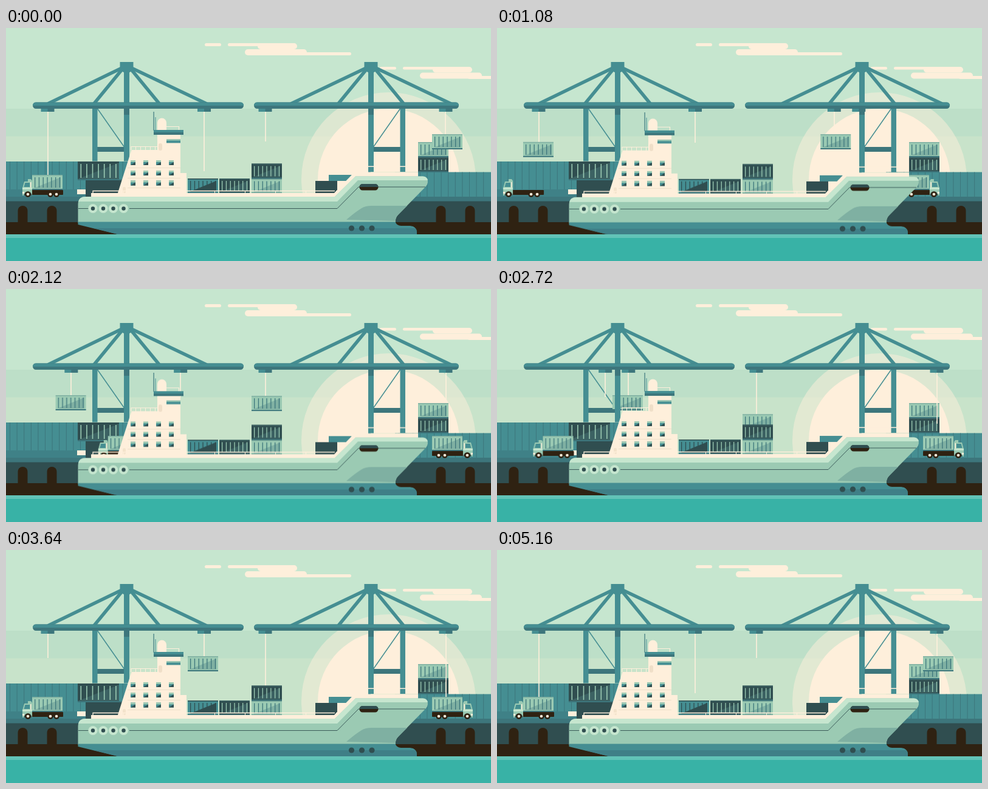
These frames come from a looping animation (798x384 px, 5.2 s). An HTML page:

```html
<!DOCTYPE html>
<html lang="en">
<head>
<meta charset="utf-8">
<title>Harbour</title>
<style>
html, body { margin: 0; width: 100%; height: 100%; overflow: hidden; background: #c6e6cf; }
svg { display: block; width: 798px; height: 384px; }
.move { animation: 5.2s cubic-bezier(.333, 0, .667, 1) infinite; }

/* left crane */
.l-out { animation-name: l-out; }
.l-back { animation-name: l-back; }
.l-load { animation-name: l-load; }
.l-free { animation-name: l-free; }
.l-box-x { animation-name: l-box-x; }
.l-box-y { animation-name: l-box-y; }
@keyframes l-out { 0%, 31.5% { transform: translateX(68.5px) } 69.4%, 100% { transform: translateX(326px) } }
@keyframes l-back { 0%, 31.5% { transform: translateX(326px) } 69.4%, 100% { transform: translateX(68.5px) } }
@keyframes l-load {
  0%, 1.7% { transform: translateY(242px) }
  28.2%, 71% { transform: translateY(175px) }
  98.3% { transform: translateY(248px) }
  98.9%, 100% { transform: translateY(236px) }
}
@keyframes l-free {
  0%, 1.7% { transform: translateY(236px) }
  28.2%, 70.2% { transform: translateY(178px) }
  95.5%, 100% { transform: translateY(242px) }
}
@keyframes l-box-x { 0%, 31.5% { transform: translateX(43px) } 69.4%, 100% { transform: translateX(299px) } }
@keyframes l-box-y {
  0%, 1.7% { transform: translateY(242px) }
  28.2%, 71% { transform: translateY(175px) }
  98.3%, 100% { transform: translateY(248px) }
}

/* right crane */
.r-out { animation-name: r-out; }
.r-back { animation-name: r-back; }
.r-load { animation-name: r-load; }
.r-free { animation-name: r-free; }
.r-box-x { animation-name: r-box-x; }
.r-box-y { animation-name: r-box-y; }
.r-lift { animation-name: r-lift; }
@keyframes r-out { 0% { transform: translateX(723.5px) } 38.1%, 100% { transform: translateX(426.5px) } }
@keyframes r-back { 0% { transform: translateX(426.5px) } 38.1%, 100% { transform: translateX(723.5px) } }
@keyframes r-load {
  0%, 38.7% { transform: translateY(175px) }
  61.7%, 71.7% { transform: translateY(224px) }
  98.2%, 100% { transform: translateY(178px) }
}
@keyframes r-free {
  0%, 38.7% { transform: translateY(187px) }
  61.7%, 71.7% { transform: translateY(242px) }
  98.2%, 100% { transform: translateY(175px) }
}
@keyframes r-box-x { 0% { transform: translateX(701px) } 38.1%, 100% { transform: translateX(404px) } }
@keyframes r-box-y { 0%, 38.7% { transform: translateY(175px) } 61.7%, 100% { transform: translateY(224px) } }
@keyframes r-lift { 0%, 71.7% { transform: translateY(242px) } 98.2%, 100% { transform: translateY(175px) } }

/* trucks and their loads */
.l-truck { animation-name: l-truck; }
.l-cargo { animation-name: l-cargo; }
.r-truck { animation-name: r-truck; }
.r-cargo { animation-name: r-cargo; }
@keyframes l-truck {
  0%, 5% { transform: none }
  11.5% { transform: translateX(2px); animation-timing-function: cubic-bezier(.32, 0, .67, 0) }
  28.4% { transform: translateX(-110px); animation-timing-function: step-start }
  29%, 36.7% { transform: translateX(180px); animation-timing-function: cubic-bezier(.33, 1, .68, 1) }
  72.4%, 100% { transform: none }
}
@keyframes l-cargo {
  0%, 36.7% { transform: translateX(180px); animation-timing-function: cubic-bezier(.33, 1, .68, 1) }
  72.4%, 100% { transform: none }
}
@keyframes r-truck {
  0%, 10.1% { transform: translateX(-133px); animation-timing-function: cubic-bezier(.33, 1, .68, 1) }
  42.4%, 75% { transform: none }
  81.5% { transform: translateX(-2px); animation-timing-function: cubic-bezier(.32, 0, .67, 0) }
  98.5%, 100% { transform: translateX(110px) }
}
@keyframes r-cargo {
  0%, 10.1% { transform: translateX(-133px); animation-timing-function: cubic-bezier(.33, 1, .68, 1) }
  42.4%, 100% { transform: none }
}

.ship { animation-name: dip; }
@keyframes dip {
  0% { transform: none }
  11.5% { transform: translateY(1px) }
  29.2% { transform: translateY(.6px) }
  58%, 100% { transform: none }
}
</style>
</head>
<body>
<svg id="stage" viewBox="0 0 798 384" xmlns="http://www.w3.org/2000/svg"></svg>
<script>
const cream = '#feefdb', pale = '#c6e6cf', mint = '#9bcab3', sage = '#7fb0a2',
      teal = '#458e92', deep = '#3d767c', dark = '#304e50', brown = '#2f2212';

const rect = (x, y, w, h, fill, r = 0) =>
  `<rect x="${x}" y="${y}" width="${w}" height="${h}" rx="${r}" fill="${fill}"/>`;
const path = (d, fill) => `<path d="${d}" fill="${fill}"/>`;
const line = (d, color, w = 1) => `<path d="${d}" fill="none" stroke="${color}" stroke-width="${w}"/>`;
const dot = (x, y, r, fill, alpha = 1) => `<circle cx="${x}" cy="${y}" r="${r}" fill="${fill}" opacity="${alpha}"/>`;
const at = (x, y, body) => `<g transform="translate(${x} ${y})">${body}</g>`;
const move = (name, body) => `<g class="move ${name}">${body}</g>`;
const row = (n, x, step, draw) => Array.from({ length: n }, (_, i) => draw(x + i * step)).join('');

function box(body = mint, shade = sage, rib = deep) {
  return rect(0, 0, 50, 25, body) + path('M3 22L47 4V22Z', shade) +
    row(7, 4, 6.8, x => rect(x, 4, 1.3, 17, rib)) +
    rect(0, 0, 50, 1.5, shade) + rect(0, 23, 50, 2, deep);
}
const darkBox = box(dark, '#3c6263', mint);
const tealBox = box(teal, dark, dark);

function truck() {
  const wheel = x => dot(x, 274, 4.8, brown) + dot(x, 274, 2.3, cream);
  return rect(14, 267, 53, 8, brown, 1) +
    path('M0 276V264L3 253H9V249H14L16 252V276Z', mint) + path('M2.500 262L4.500 255H12V262Z', teal) +
    rect(13, 254, 1.5, 11, cream) + rect(0, 263, 16, 3, pale) +
    path('M2.500 276a6.500 6.500 0 0 1 13 0Z', dark) + rect(0, 270, 3, 3, cream) +
    wheel(9) + wheel(46) + wheel(56);
}

const trolley = name => move(name, rect(-11, 132, 22, 6, teal) + rect(0, 132, 11, 6, deep));
const rope = (travel, drop) => move(travel, move(drop, rect(-.8, -300, 1.6, 300, cream)));

// Rear leg, drawn around the tower axis; dir is the side it stands on.
const leg = (x, dir, foot) => at(x, 0, `<g transform="scale(${dir} 1)">` +
  line('M48 133L4 196', teal, 1.5) + rect(4, 196, 46, 8, deep) +
  rect(48, 130, 8.5, foot - 130, teal) + '</g>');

function crane(x, from, to, stays, foot) {
  return at(x, 0,
    stays.map(s => line(`M${Math.sign(s) * 4} 64L${s} 125`, teal, 5.6)).join('') +
    rect(-4.5, 62, 9, foot - 62, teal) + rect(-4.5, 133, 9, 10, deep) +
    rect(-11, 56, 22, 13, teal) + path('M-11 69H11L5 73H-5Z', teal) +
    rect(from, 122.5, to - from, 10.5, deep, 5.2) +
    path(`M${from} 128Q${from} 122.5 ${from + 5} 122.5H${to - 5}Q${to} 122.5 ${to} 128Z`, teal));
}

function sky() {
  const clouds = [[327, 25, 27, 5], [365, 25, 110, 5], [414, 25, 65, 10], [393, 35, 102, 10], [470, 40, 98, 5],
    [615, 64, 27, 4.5], [653, 64, 100, 4.5], [702, 64, 65, 9.5], [681, 73.5, 102, 10], [760, 79, 50, 5]];
  return rect(0, 0, 798, 384, pale) + rect(0, 133, 798, 46, '#bddfc8') + rect(0, 178.5, 798, 162, '#c8e3ca') +
    dot(629.5, 249.5, 143.5, cream, .5) + dot(629.5, 249.5, 116.5, cream) +
    clouds.map(([x, y, w, h]) => rect(x, y, w, h, cream, h / 2)).join('');
}

function quay() {
  const arch = x => path(`M${x} 322V301a8 8 0 0 1 16 0V322Z`, brown);
  const wall = (x, y, w) => rect(x, y, w, 280 - y, teal) +
    row(Math.floor(w / 11.6), x + 6, 11.6, s => rect(s, y, 1, 278 - y, deep));
  return wall(0, 220, 205) + rect(0, 266, 205, 13, '#3f8187') + wall(640, 237.5, 158) +
    rect(0, 278, 798, 8, deep) + rect(0, 285.5, 798, 35, dark) + rect(0, 320, 798, 21, brown) +
    [19.5, 67.5, 707.5, 755.5].map(arch).join('') +
    rect(118, 220, 68, 30, dark) + path('M118 249L186 222V249Z', '#3c6263') +
    row(7, 122.5, 9.6, x => rect(x, 224, 1.6, 23, mint)) +
    rect(118, 249, 84, 2, deep) + rect(131, 251, 72, 28, dark) + rect(117, 266, 14, 8, cream);
}

function bridge() {
  const pane = (x, y) => rect(x, y, 8, 8, teal) + rect(x, y, 8, 3, mint) +
    path(`M${x} ${y + 8}L${x + 8} ${y + 3}V${y + 8}Z`, dark);
  return path('M182 278L206.500 201H249V174H287V239H297V278Z', cream) + rect(192, 272, 105, 6, '#f3e3cb') +
    [230, 247, 263].map(y => rect(200, y, 87, .8, '#eadcc6')).join('') +
    rect(192, 262, 5, 10, '#f3e3cb', 2) +
    [218, 235, 251.5].map(y => row(4, 205, 21, x => pane(x, y))).join('') +
    line('M206 201V195.5H249', cream, 1.2) + row(5, 213, 8, x => rect(x, 195, 1, 6, cream)) +
    rect(251, 190, 6, 12, '#f0dfc8', 3) +
    rect(264, 183.5, 23, 6, teal) + rect(264, 183.5, 23, 2, mint) +
    path('M249 168V156a7.5 7.5 0 0 1 15 0V168Z', cream) + line('M264 162.5H284.5V168', cream, 1.2) +
    rect(242.5, 138, 1.2, 31, deep) + rect(245.5, 147, 1, 22, teal) +
    rect(243, 168, 49, 8, teal) + rect(243, 172, 49, 4, deep);
}

function ship() {
  const port = x => dot(x, 297.5, 7.6, pale) + dot(x, 297.5, 3.2, dark);
  return at(299, 248, tealBox) + at(351, 248, darkBox) + at(404, 248.5, box()) + at(404, 223.5, darkBox) +
    rect(509, 252, 36, 22, dark) + rect(531, 242, 40, 10, teal) +
    bridge() +
    // bow deck
    path('M539 273L568 243L572 237.500H678V246H580L548 280H539Z', cream) + rect(596, 227.5, 64, 1.5, cream) +
    rect(600, 237, 78, .8, '#e3e9d0') +
    rect(140, 272, 403, 7, cream) + line('M143 273V268.5H541', cream, 1.3) +
    row(8, 193, 50, x => rect(x, 268, 1, 5, cream)) +
    // hull
    path('M118.500 322V290Q119 278 131 278H541L575 244.500H686Q694 245 694 253Q694 258 690 262L646 307Q640 313 641 321H118.500Z', mint) +
    path('M119 287Q120 278 131 278H541L575 244.500H686Q693 245 694 251H579L545 286H119Z', pale) +
    path('M560 316Q575 303 585 297Q591 293 602 293H660L646 307Q640 313 641 318Z', sage) +
    line('M119 297.5H136M203 297.5H545L580 262H690', dark, .9) +
    path('M118.500 319.500H640.500Q643 326 650 326H665Q676 327 676 337V342H192L118.500 324Z', teal) +
    path('M145 330H674Q676 333 676 342H192Z', '#3f7f87') +
    [143, 160, 176.5, 193.5].map(port).join('') +
    [568.5, 585.5, 602].map(x => dot(x, 330, 4.6, dark)).join('') +
    rect(581.5, 257, 31, 10.5, brown, 5.2) + path('M581.500 262Q582 257 587 257H607Q612 257 612.500 262Z', dark);
}

document.getElementById('stage').innerHTML =
  '<clipPath id="below"><rect y="132" width="798" height="252"/></clipPath>' +
  sky() + leg(198.5, -1, 219.5) + leg(600.5, 1, 245) + quay() +
  at(678, 188, box()) + at(678, 213, darkBox) +
  move('l-truck', at(27, 0, truck())) + move('l-cargo', at(43, 242, box())) +
  move('r-truck', `<g transform="translate(768 0) scale(-1 1)">${truck()}</g>`) +
  '<g clip-path="url(#below)">' +
  rope('l-out', 'l-load') + rope('l-back', 'l-free') + rope('r-out', 'r-load') + rope('r-back', 'r-free') + '</g>' +
  move('l-box-x', move('l-box-y', box())) + move('r-box-x', move('r-box-y', box())) +
  move('r-cargo', at(701, 0, move('r-lift', box()))) +
  ['l-out', 'l-back', 'r-out', 'r-back'].map(trolley).join('') +
  crane(198.5, -154.5, 192.5, [-130, -54, 54, 132], 219.5) +
  crane(600.5, -192.5, 144.5, [-132, -54, 54, 132], 245) +
  move('ship', ship()) +
  rect(0, 340, 798, 44, '#38b2a6') + rect(0, 340, 798, 6, '#62c3b7');
</script>
</body>
</html>
```
